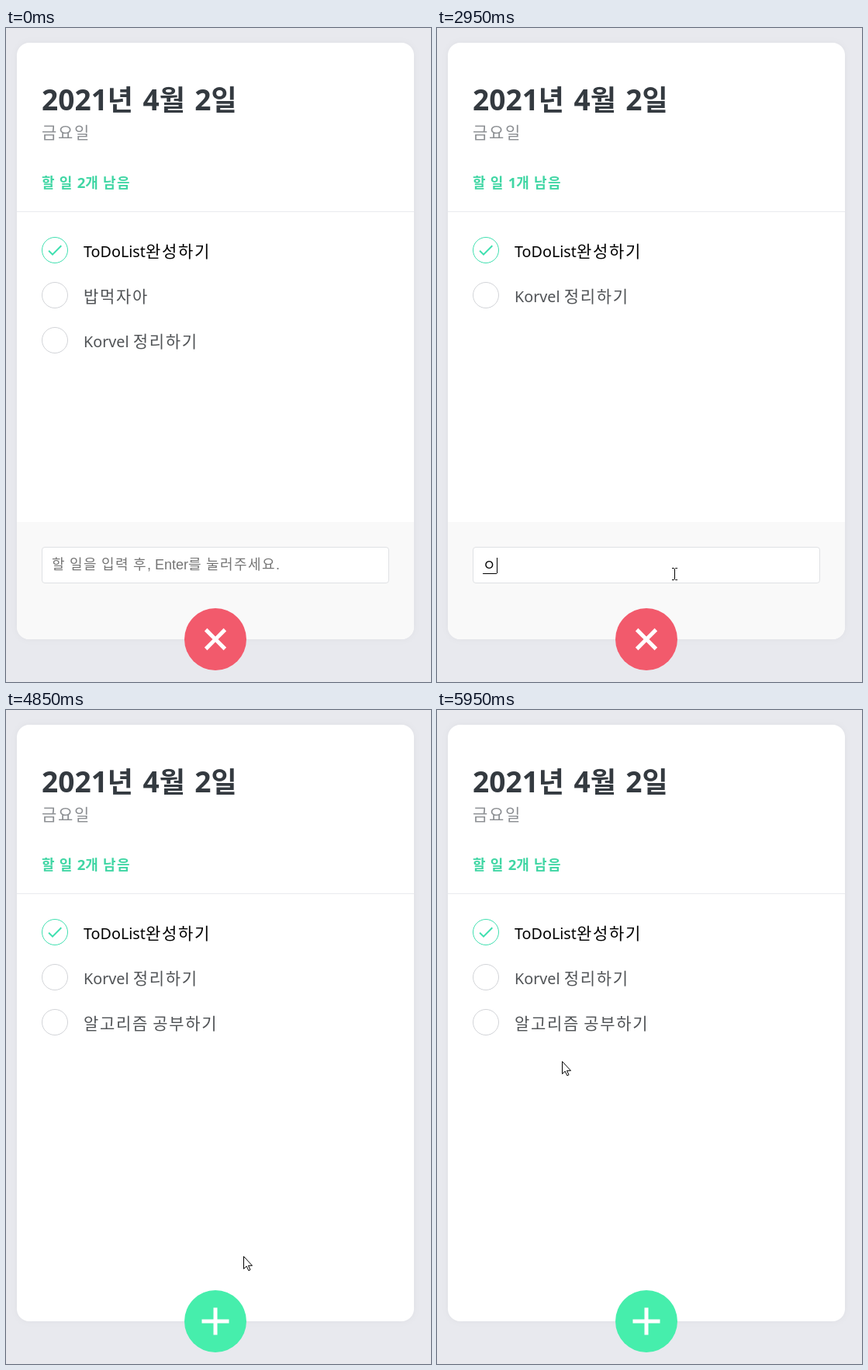
Animation of 548x842 px, one loop 6000 ms. Source, as an HTML page:

```html
<!DOCTYPE html>
<html lang="ko">
<head>
<meta charset="utf-8">
<style>
  html, body { margin: 0; width: 100%; height: 100%; overflow: hidden; background: #e8e9ee; }
  svg { display: block; font-family: "Noto Sans", "Noto Sans CJK KR", sans-serif; }
  .ko { font-family: "Noto Sans CJK KR", "Noto Sans CJK JP", sans-serif; letter-spacing: .08em; }
  .light .ko, .value { font-weight: 350; }
  .field { font-family: "Liberation Sans", "Noto Sans CJK KR", sans-serif; }
  .card { filter: drop-shadow(0 0 4px rgba(0, 0, 0, .04)); }
  .value { font-size: 18px; letter-spacing: .08em; line-height: 28px; white-space: pre; color: #000; }
  .value u { text-decoration: none; box-shadow: 0 1px #000; display: inline-block; height: 24px; vertical-align: top; }
  .value i { display: inline-block; width: 1px; height: 20px; margin: 4px -1px 0 0; background: #000; vertical-align: top; }
</style>
</head>
<body>
<svg id="stage" width="548" height="842" viewBox="0 0 548 842"></svg>
<script>
const LOOP = 6000, STEP = 50;
const MINT = '#3fe0b0', RED = [242, 90, 108], GREEN = [70, 238, 172];
const DELETE_AT = 1400, FOCUS_AT = 1850, ENTER_AT = 4400;
const toggles = [[ENTER_AT, 0], [5500, 1], [5700, 0]];

// Pointer path: time, x, y
const path = [
  [50, 300, 686], [450, 476, 420], [600, 476, 420], [1100, 477, 367], [1150, 477, 367],
  [1200, 481, 361], [1250, 482, 347], [DELETE_AT, 482, 347], [1900, 306, 703],
  [4850, 306, 703], [5350, 285, 779], [5700, 285, 779], [5950, 161, 452]
];

// Each key press and the text it leaves in the field
const firstWord = 'ㅇ 아 알 앍 알고 알골 알고리 알고맂 알고리즈 알고리즘'.split(' ');
const secondWord = ',ㄱ,고,공,공ㅂ,공부,공붛,공부하,공부학,공부하기'.split(',');
const typed = [
  [2550, 'd'], [2700, ''],
  ...firstWord.map((s, i) => [2950 + i * 55, s]),
  ...secondWord.map((s, i) => [3700 + i * 55, '알고리즘 ' + s]),
  [ENTER_AT, '']
];

const icons = {
  done: 'M9 16.2 4.8 12l-1.4 1.4L9 19 21 7l-1.4-1.4z',
  trash: 'M6 19c0 1.1.9 2 2 2h8c1.1 0 2-.9 2-2V7H6zM19 4h-3.5l-1-1h-5l-1 1H5v2h14z',
  plus: 'M19 13h-6v6h-2v-6H5v-2h6V5h2v6h6z'
};
const pointers = {
  arrow: '<path d="M.5 .5v16l3.7-3.4 2.6 5.6 2.2-1-2.5-5.4h5z" fill="#fff" stroke="#000"/>',
  beam: '<path d="M-3 -7.5h2.5l1 1 1-1H4M.5 -6.5v13M-3 7.5h2.5l1-1 1 1H4" fill="none" stroke="#000"/>',
  hand: `<path d="M-1.5 14V2a1.75 1.75 0 0 1 3.5 0v6a1.7 1.7 0 0 1 3.4 0v1a1.6 1.6 0 0 1 3.2 0v1
    a1.5 1.5 0 0 1 3 1v5q0 3-2 5v3h-8v-3q-2-1.5-4-5l-3-4q-.5-2 1.5-2 1.5.5 3 2.5z"
    fill="#fff" stroke="#000"/>`
};

const valueAt = t => typed.reduce((text, [at, next]) => t >= at ? next : text, '');
const icon = (name, x, y, fill, scale = 1) =>
  `<path d="${icons[name]}" transform="translate(${x} ${y}) scale(${scale})" fill="${fill}"/>`;

// Hangul and Latin runs are sized separately so they sit together evenly
function label(x, y, size, fill, text, { latin = .94, attrs = 'class="light"' } = {}) {
  const runs = text.replace(/[가-힣]+/g, `<tspan class="ko" font-size="${size}">$&</tspan>`);
  return `<text x="${x}" y="${y}" font-size="${size * latin}" fill="${fill}" ${attrs}>${runs}</text>`;
}

function pointerAt(t) {
  const i = path.findIndex(([at]) => at > t);
  if (i < 0) return path.at(-1).slice(1);
  if (!i) return null;
  const [t0, x0, y0] = path[i - 1], [t1, x1, y1] = path[i];
  const p = (t - t0) / (t1 - t0), e = p * p * (3 - 2 * p);
  return [x0 + (x1 - x0) * e, y0 + (y1 - y0) * e];
}

// 1 is the open red button, 0 the closed green one
function openness(t) {
  const last = toggles.filter(([at]) => t >= at).at(-1);
  if (!last) return 1;
  const p = Math.min(1, (t - last[0]) / 125) ** 1.7;
  return last[1] ? p : 1 - p;
}

function todoRow({ text, done }, i, hovered, hot) {
  const y = 286 + i * 58;
  return `<circle cx="63" cy="${y}" r="16.5" fill="none" stroke="${done ? MINT : '#d2d4d8'}"/>`
    + (done ? icon('done', 51, y - 12, MINT) : '')
    + label(100, y + 9, 21, done ? '#000' : '#505356', text)
    + (hovered ? icon('trash', 470, y - 12, hot ? '#ff6b6b' : '#e0e1e3') : '');
}

function form(t) {
  const text = valueAt(t), composing = /[ㄱ-힣]$/.test(text);
  const caretOn = t >= FOCUS_AT && !(t >= 2350 && t < 2550) && !(t >= 4350 && t < ENTER_AT);
  const content = composing ? `${text.slice(0, -1)}<u>${text.at(-1)}</u>` : text;
  return `<path d="M14 636h512v135a16 16 0 0 1-16 16H30a16 16 0 0 1-16-16z" fill="#f9f9f9"/>
    <rect x="46.5" y="668.5" width="447" height="46" rx="3.5" fill="#fff" stroke="#dfe1e4"/>`
    + (text ? '' : label(59, 697, 18, '#757575', '할 일을 입력 후, Enter를 눌러주세요.',
      { latin: 1, attrs: 'class="field light"' }))
    + `<foreignObject x="59" y="678" width="420" height="30">
        <div class="value field">${content}${caretOn ? '<i></i>' : ''}</div></foreignObject>`;
}

function addButton(t) {
  const p = openness(t), color = GREEN.map((c, i) => Math.round(c + (RED[i] - c) * p));
  return `<g transform="translate(270 787) rotate(${45 * p})">
    <circle r="40" fill="rgb(${color})"/>${icon('plus', -30, -30, '#fff', 2.5)}</g>`;
}

function render(t) {
  const open = t < toggles[0][0] || (t >= toggles[1][0] && t < toggles[2][0]);
  const todos = [{ text: 'ToDoList완성하기', done: true }];
  if (t < DELETE_AT) todos.push({ text: '밥먹자아' });
  todos.push({ text: 'Korvel 정리하기' });
  if (t >= ENTER_AT) todos.push({ text: '알고리즘 공부하기' });

  const pointer = pointerAt(t), [px, py] = pointer || [-99, -99];
  const hover = px > 46 && px < 494 ? Math.floor((py - 257) / 58) : -1;
  const hot = hover >= 0 && hover < todos.length && px >= 470 && Math.abs(py - 286 - hover * 58) < 12;
  const inField = open && px > 46 && px < 494 && py > 668 && py < 715;
  const onButton = Math.hypot(px - 270, py - 787) < 40;
  const shape = inField ? 'beam' : onButton || hot ? 'hand' : 'arrow';
  const left = todos.filter(todo => !todo.done).length;
  const bold = { latin: 1.03, attrs: 'font-weight="700"' };

  stage.innerHTML = `<rect class="card" x="14" y="19" width="512" height="768" rx="16" fill="#fff"/>
    <path d="M14 236.5h512" stroke="#e9ebee"/>`
    + label(46, 106, 36, '#343a40', '2021년 4월 2일', bold)
    + label(46, 142, 21, '#8b8e92', '금요일')
    + label(46, 206, 18, '#40d6a4', `할 일 ${left}개 남음`, bold)
    + todos.map((todo, i) => todoRow(todo, i, i === hover, hot)).join('')
    + (open ? form(t) : '')
    + addButton(t)
    + (pointer ? `<g transform="translate(${Math.round(px)} ${Math.round(py)})">${pointers[shape]}</g>` : '');
}

const stage = document.getElementById('stage');
const start = performance.now();
let shown = -1;
function tick() {
  const t = Math.floor((performance.now() - start) % LOOP / STEP) * STEP;
  if (t !== shown) render(shown = t);
  requestAnimationFrame(tick);
}
tick();
</script>
</body>
</html>
```
